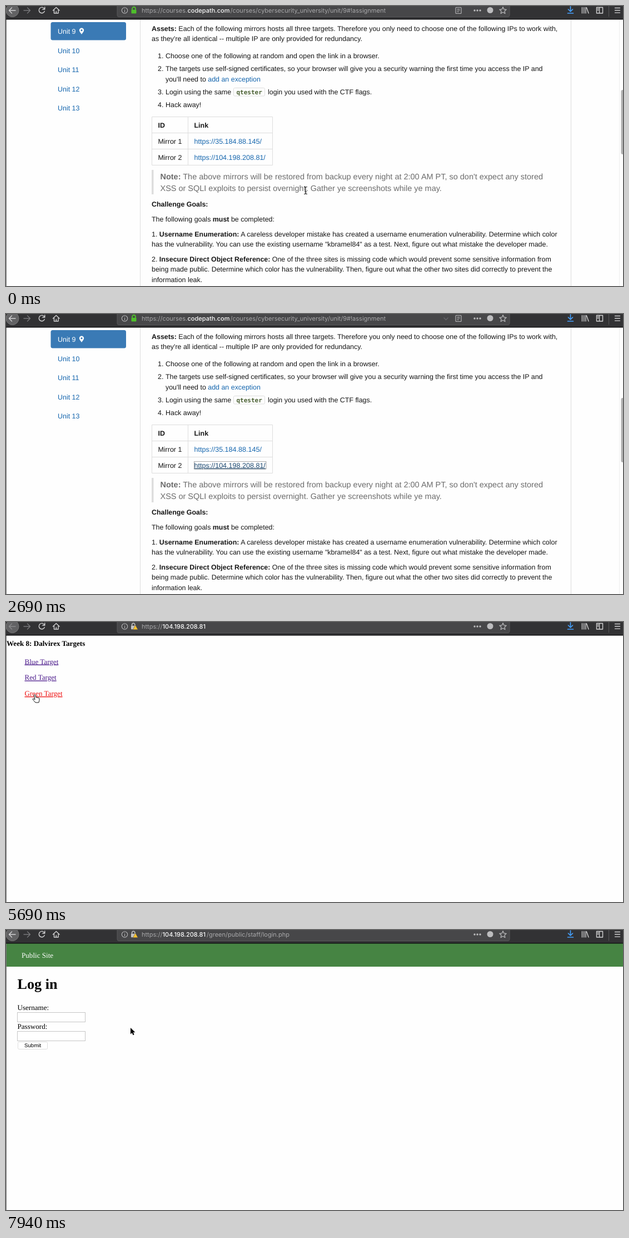
These frames come from a looping animation (1110x504 px, 8000 ms). An HTML page:

```html
<!DOCTYPE html>
<html lang="en">
<head>
<meta charset="utf-8">
<title>Browser walkthrough</title>
<style>
html, body { margin: 0; width: 100%; height: 100%; overflow: hidden; background: #fff; }
svg { display: block; width: 1110px; height: 504px; text-rendering: geometricPrecision; }
.sans { font: 12.43px "Liberation Sans", Arial, sans-serif; fill: #161616; }
.serif { font: 13.1px "Liberation Serif", Times, serif; fill: #000; }
.ui { font: 11.1px Inter, Roboto, sans-serif; }
.link { fill: #1566ae; }
.address { font-size: 12.55px; }
.note { font-size: 14.48px; fill: #6c6c6c; }
.code { font: bold 11px "DejaVu Sans Mono", monospace; fill: #4a6032; }
.visited { fill: #4b1a8b; text-decoration: underline; }
.nav { fill: #fff; }
.title { font-size: 26.2px; font-weight: bold; }
.rule { fill: none; stroke: #ddd; }
.icon { fill: none; stroke: #d2d2d3; stroke-width: 1.4; stroke-linecap: round; stroke-linejoin: round; }
.url { font-size: 11.02px; fill: #a9a9ab; }
.host { fill: #fafafa; font-weight: 500; }

/* Every timed part holds its state until the next keyframe. */
.timed { opacity: 0; animation: 8s step-end infinite; }
.course { animation-name: course; }
.targets { animation-name: targets; }
.home { animation-name: home; }
.login { animation-name: login; }
.insecure { animation-name: insecure; }
.back { animation-name: back; }
.caret { animation-name: caret; }
.reload { animation-name: reload; }
.stop { animation-name: stop; }
.idle { animation-name: idle; }
.hover { animation-name: hover; }
.focus { animation-name: focus; }
.menu { animation-name: menu; }
.pick { animation-name: pick; }
.plain { animation-name: plain; }
.pressed { animation-name: pressed; }
.ibeam { animation-name: ibeam; }
.hand { animation-name: hand; }
.arrow { animation-name: arrow; }
@keyframes course { 0% { opacity: 1 } 44.875% { opacity: 0 } }
@keyframes targets { 44.875% { opacity: 1 } 73% { opacity: 0 } }
@keyframes home { 73% { opacity: 1 } 86.125% { opacity: 0 } }
@keyframes login { 86.125% { opacity: 1 } }
@keyframes insecure { 44.875% { opacity: 1 } }
@keyframes back { 0%, 73% { opacity: 1 } 44.875% { opacity: .35 } }
@keyframes caret { 31.875% { opacity: 1 } 44.875% { opacity: 0 } }
@keyframes reload { 0%, 95.5% { opacity: 1 } 86.125% { opacity: 0 } }
@keyframes stop { 86.125% { opacity: 1 } 95.5% { opacity: 0 } }
@keyframes idle { 0% { opacity: 1 } 7.5% { opacity: 0 } }
@keyframes hover { 7.5% { opacity: 1 } }
@keyframes focus { 11.25% { opacity: 1 } }
@keyframes menu { 11.25% { opacity: 1 } 22.5% { opacity: 0 } }
@keyframes pick { 15% { opacity: 1 } 20.625% { opacity: 0 } }
@keyframes plain { 0% { opacity: 1 } 71.125% { opacity: 0 } }
@keyframes pressed { 71.125% { opacity: 1 } }
@keyframes ibeam { 0%, 31.875% { opacity: 1 } 5.625%, 33.625% { opacity: 0 } }
@keyframes hand {
  7.5%, 65.5%, 82.375% { opacity: 1 }
  15%, 73%, 86.125% { opacity: 0 }
}
@keyframes arrow {
  5.625%, 15%, 50.5%, 73%, 86.125% { opacity: 1 }
  7.5%, 31.875%, 65.5%, 82.375% { opacity: 0 }
}
.cursor { animation: travel 8s step-end infinite; }
@keyframes travel {
  0% { transform: translate(539px, 332px) }
  1.875% { transform: translate(524px, 323px) }
  3.75% { transform: translate(486px, 303px) }
  5.625% { transform: translate(445px, 281px) }
  7.5% { transform: translate(419px, 270px) }
  15% { transform: translate(440px, 277px) }
  16.875% { transform: translate(452px, 281px) }
  26.25% { transform: translate(446px, 226px) }
  28.125% { transform: translate(420px, 165px) }
  30% { transform: translate(368px, 76px) }
  31.875% { transform: translate(318px, 8px) }
  50.5% { transform: translate(398px, 104px) }
  56.125% { transform: translate(384px, 109px) }
  58% { transform: translate(310px, 129px) }
  59.875% { transform: translate(190px, 147px) }
  61.75% { transform: translate(95px, 152px) }
  63.625% { transform: translate(40px, 144px) }
  65.5% { transform: translate(52px, 131px) }
  74.875% { transform: translate(62px, 127px) }
  76.75% { transform: translate(130px, 111px) }
  78.625% { transform: translate(265px, 84px) }
  80.5% { transform: translate(395px, 58px) }
  82.375% { transform: translate(453px, 45px) }
  88% { transform: translate(450px, 70px) }
  89.875% { transform: translate(422px, 160px) }
  91.75% { transform: translate(384px, 245px) }
  99.25% { transform: translate(224px, 176px) }
}
</style>
</head>
<body>
<svg viewBox="0 0 1110 504">
  <defs>
    <filter id="shadow" x="-10%" y="-10%" width="120%" height="120%">
      <feDropShadow dx="0" dy="2" stdDeviation="2.5" flood-opacity=".35"/>
    </filter>
  </defs>
  <rect width="1110" height="504" fill="#fefefe"/>

  <!-- Course page -->
  <g class="timed course sans">
    <path class="rule" d="M241.5 24V504M1016.5 24V504"/>
    <path d="M1103.5 24V504" stroke="#eee"/>
    <rect x="1106.5" y="151" width="6" height="116" rx="3" fill="#b0b0b0"/>

    <rect x="80.5" y="29" width="135.5" height="32.5" rx="3.5" fill="#3a7ab5"/>
    <text x="93" y="50" fill="#fff">Unit 9</text>
    <path d="M136 51C133.8 47.5 131.8 46 131.8 43.7A4.2 4.2 0 0 1 140.2 43.7C140.2 46 138.2 47.5 136 51Z" fill="#fff"/>
    <circle cx="136" cy="43.7" r="1.6" fill="#3a7ab5"/>
    <g class="link">
      <text x="93" y="84.7">Unit 10</text>
      <text x="93" y="119.2">Unit 11</text>
      <text x="93" y="153.7">Unit 12</text>
      <text x="93" y="188.2">Unit 13</text>
    </g>

    <text x="262" y="44.5"><tspan font-weight="bold">Assets:</tspan> Each of the following mirrors hosts all three targets. Therefore you only need to choose one of the following IPs to work with,</text>
    <text x="262" y="62.5">as they're all identical -- multiple IP are only provided for redundancy.</text>
    <text x="273" y="93.7">1.</text>
    <text x="287" y="93.7">Choose one of the following at random and open the link in a browser.</text>
    <text x="273" y="117">2.</text>
    <text x="287" y="117">The targets use self-signed certificates, so your browser will give you a security warning the first time you access the IP and</text>
    <text x="287" y="135.5">you'll need to <tspan class="link">add an exception</tspan></text>
    <text x="273" y="159">3.</text>
    <text x="287" y="159">Login using the same</text>
    <rect class="rule" x="409.5" y="147.5" width="56" height="14.5" rx="2"/>
    <text class="code" x="414.5" y="158.5">qtester</text>
    <text x="471" y="159">login you used with the CTF flags.</text>
    <text x="273" y="182.3">4.</text>
    <text x="287" y="182.3">Hack away!</text>

    <path class="rule" d="M262.5 199.5H479.5V286.5H262.5ZM262.5 228.5H479.5M262.5 257.5H479.5M327.5 199.5V286.5"/>
    <g font-weight="bold"><text x="273.5" y="218.5">ID</text><text x="338.5" y="218.5">Link</text></g>
    <text x="273.5" y="248">Mirror 1</text>
    <text x="273.5" y="276.8">Mirror 2</text>
    <g class="address">
      <text class="link" x="338.5" y="248">https://35.184.88.145/</text>
      <text class="timed idle link" x="338.5" y="276.8">https://104.198.208.81/</text>
      <text class="timed hover" x="338.5" y="276.8" fill="#1d4a72" text-decoration="underline">https://104.198.208.81/</text>
    </g>
    <rect class="timed focus" x="338.5" y="265.5" width="129.5" height="13.5" fill="none" stroke="#555" stroke-dasharray="1 1"/>

    <rect x="262" y="295" width="3.5" height="44" fill="#ddd"/>
    <g class="note">
      <text x="277.5" y="312"><tspan font-weight="bold">Note:</tspan> The above mirrors will be restored from backup every night at 2:00 AM PT, so don't expect any stored</text>
      <text x="277.5" y="333.3">XSS or SQLI exploits to persist overnight. Gather ye screenshots while ye may.</text>
    </g>
    <text x="262" y="361.3" font-weight="bold">Challenge Goals:</text>
    <text x="262" y="387.7">The following goals <tspan font-weight="bold">must</tspan> be completed:</text>
    <text x="262" y="414.7">1. <tspan font-weight="bold">Username Enumeration:</tspan> A careless developer mistake has created a username enumeration vulnerability. Determine which color</text>
    <text x="262" y="433">has the vulnerability. You can use the existing username "kbramel84" as a test. Next, figure out what mistake the developer made.</text>
    <text x="262" y="459.7">2. <tspan font-weight="bold">Insecure Direct Object Reference:</tspan> One of the three sites is missing code which would prevent some sensitive information from</text>
    <text x="262" y="478">being made public. Determine which color has the vulnerability. Then, figure out what the other two sites did correctly to prevent the</text>
    <text x="262" y="496.7">information leak.</text>
  </g>

  <!-- Target list -->
  <g class="timed targets serif">
    <text x="1" y="42.8" font-weight="bold">Week 8: Dalvirex Targets</text>
    <text class="visited" x="33.5" y="75.5">Blue Target</text>
    <text class="visited" x="33.5" y="104.3">Red Target</text>
    <text class="timed plain visited" x="33.5" y="133">Green Target</text>
    <text class="timed pressed" x="33.5" y="133" fill="#e11" text-decoration="underline">Green Target</text>
  </g>

  <!-- Green site, home -->
  <g class="timed home serif">
    <rect y="24" width="1110" height="42" fill="#468443"/>
    <g class="nav">
      <text x="28" y="50">Home</text>
      <text x="99.5" y="50">About Dalvirex</text>
      <text x="221" y="50">Find a Salesperson</text>
      <text x="359.5" y="50">Contact</text>
      <text x="440" y="50">Login</text>
    </g>
    <text class="title" x="20.5" y="106">Welcome to Dalvirex!</text>
    <text x="20.5" y="143.8">Dalvirex is a world-wide industry leader with many award-winning products</text>
    <text x="20.5" y="159.3">which have become well-known household names. Our staff of experts are</text>
    <text x="20.5" y="174.8">dedicated to finding synergies across a wide variety of vertical markets and</text>
    <text x="20.5" y="190.3">integrating technology into everyday life.</text>
  </g>

  <!-- Green site, log in -->
  <g class="timed login serif">
    <rect y="24" width="1110" height="42" fill="#468443"/>
    <text class="nav" x="28" y="50">Public Site</text>
    <text class="title" x="20.5" y="106">Log in</text>
    <text x="20.5" y="143.8">Username:</text>
    <text x="20.5" y="177.5">Password:</text>
    <g fill="#fff" stroke="#c6c6c6">
      <rect x="20.5" y="148.5" width="122" height="17"/>
      <rect x="20.5" y="182.5" width="122" height="17"/>
      <rect x="21.5" y="201.5" width="53" height="13" rx="2" stroke="#ddd"/>
    </g>
    <text class="sans" x="48" y="211.3" text-anchor="middle" style="font-size:9.7px;fill:#000">Submit</text>
  </g>
  <path d="M.5 24V504" stroke="#777"/>

  <!-- Context menu -->
  <g class="timed menu ui" fill="#111">
    <rect x="419.5" y="270.5" width="242" height="192.5" rx="4" fill="#ececec" stroke="#c4c4c4" stroke-width=".6" filter="url(#shadow)"/>
    <path d="M420 325.5H661M420 413.5H661M420 438.5H661" stroke="#d6d6d6" stroke-width="1.5"/>
    <text x="437" y="285.7">Open Link in New Tab</text>
    <text x="437" y="301.2">Open Link in New Window</text>
    <text x="437" y="316.9">Open Link in New Private Window</text>
    <text x="437" y="342.3">Bookmark This Link</text>
    <text x="437" y="358">Save Link As…</text>
    <text x="437" y="373.5">Save Link to Hamper</text>
    <text x="437" y="389">Copy Link Location</text>
    <text x="437" y="404.7">Search Zambel for “https://104.198…”</text>
    <text x="437" y="430">Send Link to Device</text>
    <path d="M644.5 422.3V429.7L651 426Z" fill="#444"/>
    <text x="437" y="455.5">Inspect Element</text>
    <g class="timed pick">
      <rect x="420" y="274" width="241" height="15.6" fill="#3b87f5"/>
      <text x="437" y="285.7" fill="#fff">Open Link in New Tab</text>
    </g>
  </g>

  <!-- Toolbar -->
  <rect width="1110" height="24" fill="#323234"/>
  <rect y="23" width="1110" height="1.5" fill="#111113"/>
  <rect x="200" y="-4" width="706" height="23.5" rx="3" fill="#474749" stroke="#58585a"/>
  <circle cx="11.5" cy="8" r="11.5" fill="#626264" stroke="#777"/>
  <g class="icon">
    <path class="timed back" d="M17 8H5.5M10.5 3L5.5 8L10.5 13"/>
    <path d="M32 8H43.5M38.5 3L43.5 8L38.5 13" stroke="#77777a"/>
    <path class="timed reload" d="M69 5A5.2 5.2 0 1 0 69.3 9.5M69.8 2V6H65.8"/>
    <path class="timed stop" d="M60 3.5L69 12.5M69 3.5L60 12.5"/>
    <path d="M84.5 8L90.3 2.5L96.1 8M86.5 7V13H94.1V7M90.3 13V9.5"/>
    <g stroke-width="1.1" stroke="#b9b9bb">
      <circle cx="213.5" cy="8" r="5.2"/>
      <path d="M213.5 7.5V10.7M213.5 5.2V5.3"/>
    </g>
    <path d="M894 1.8L895.8 5.9L900.2 6.3L896.9 9.2L897.9 13.6L894 11.3L890.1 13.6L891.1 9.2L887.8 6.3L892.2 5.9Z" stroke="#bcbcbe" stroke-width="1.2"/>
    <path d="M1015.5 1V9.5M1011.5 6L1015.5 10L1019.5 6M1010.5 13H1020.5" stroke="#45a1ff" stroke-width="1.7"/>
    <path d="M1036.5 2.5V13M1039.8 2.5V13M1043 2.5V13M1044.5 3L1048 13"/>
    <path d="M1062.5 2.5H1073.5V13H1062.5ZM1067.5 2.5V13M1064.3 5H1065.7M1064.3 7.5H1065.7"/>
    <path d="M1084.5 0V19" stroke="#5a5a5c" stroke-width="1"/>
    <path d="M1095.5 3.5H1104.5M1095.5 7.8H1104.5M1095.5 12.1H1104.5"/>
  </g>
  <g fill="#bcbcbe">
    <circle cx="843" cy="8" r="1.7"/><circle cx="848" cy="8" r="1.7"/><circle cx="853" cy="8" r="1.7"/>
    <circle cx="871" cy="7.5" r="5.5"/>
  </g>
  <g class="timed course">
    <path d="M227 7V5A3 3 0 0 1 233 5V7" fill="none" stroke="#4fc02c" stroke-width="1.8"/>
    <rect x="225.5" y="6.8" width="9" height="6.7" rx="1" fill="#4fc02c"/>
    <g fill="none" stroke="#bcbcbe" stroke-width="1.1">
      <rect x="809" y="2.5" width="10" height="11" rx="1"/>
      <path d="M811.5 5.5H816.5M811.5 8H816.5M811.5 10.5H814.5"/>
    </g>
  </g>
  <path class="timed caret" d="M787.5 6.5L791.5 10.5L795.5 6.5" fill="none" stroke="#66666a" stroke-width="1.3"/>
  <g class="timed insecure">
    <path d="M226.5 7V5A2.7 2.7 0 0 1 232 5V7" fill="none" stroke="#c4c4c6" stroke-width="1.5"/>
    <rect x="225" y="6.8" width="8.5" height="6.5" rx="1" fill="#c4c4c6"/>
    <path d="M232.8 5.5L237.3 13.7H228.3Z" fill="#fcc22c" stroke="#474749" stroke-width=".5"/>
  </g>

  <g class="ui url">
    <text class="timed course" x="244" y="12">https://courses.<tspan class="host" x="326.5">codepath.com</tspan><tspan x="403.5">/courses/cybersecurity_university/unit/9#!assignment</tspan></text>
    <text class="timed insecure" x="244" y="12">https://<tspan class="host" x="281.5">104.198.208.81</tspan></text>
    <text class="timed home" x="361" y="12">/green/public/</text>
    <text class="timed login" x="361" y="12">/green/public/staff/login.php</text>
  </g>

  <!-- Pointer -->
  <g class="cursor">
    <path class="timed ibeam" d="M-2.5 -6.5Q0 -6.5 0 -4.5Q0 -6.5 2.5 -6.5M0 -4.5V4.5M-2.5 6.5Q0 6.5 0 4.5Q0 6.5 2.5 6.5M-1.5 2.5H1.5" fill="none" stroke="#222" stroke-width="1.1" stroke-linecap="round"/>
    <path class="timed hand" d="M-1.5 .8C-1.5 -.6 .6 -.7 1 .8L2 5C2.5 4.2 4 4.3 4.2 5.4C5 4.6 6.2 5 6.3 6C7.2 5.4 8 6 8 7L7.9 10.5L6.8 14H1L-1.8 10.8L-4 8C-4 6.6 -2.2 6.7 -1 8L0 8.8Z" fill="#fff" stroke="#111" stroke-linejoin="round"/>
    <path class="timed arrow" d="M0 0V11.5L2.7 9L4.6 13.2L6.6 12.3L4.8 8.3H8.4Z" fill="#000" stroke="#fff" stroke-width="1.2" paint-order="stroke"/>
  </g>
</svg>
</body>
</html>
```
